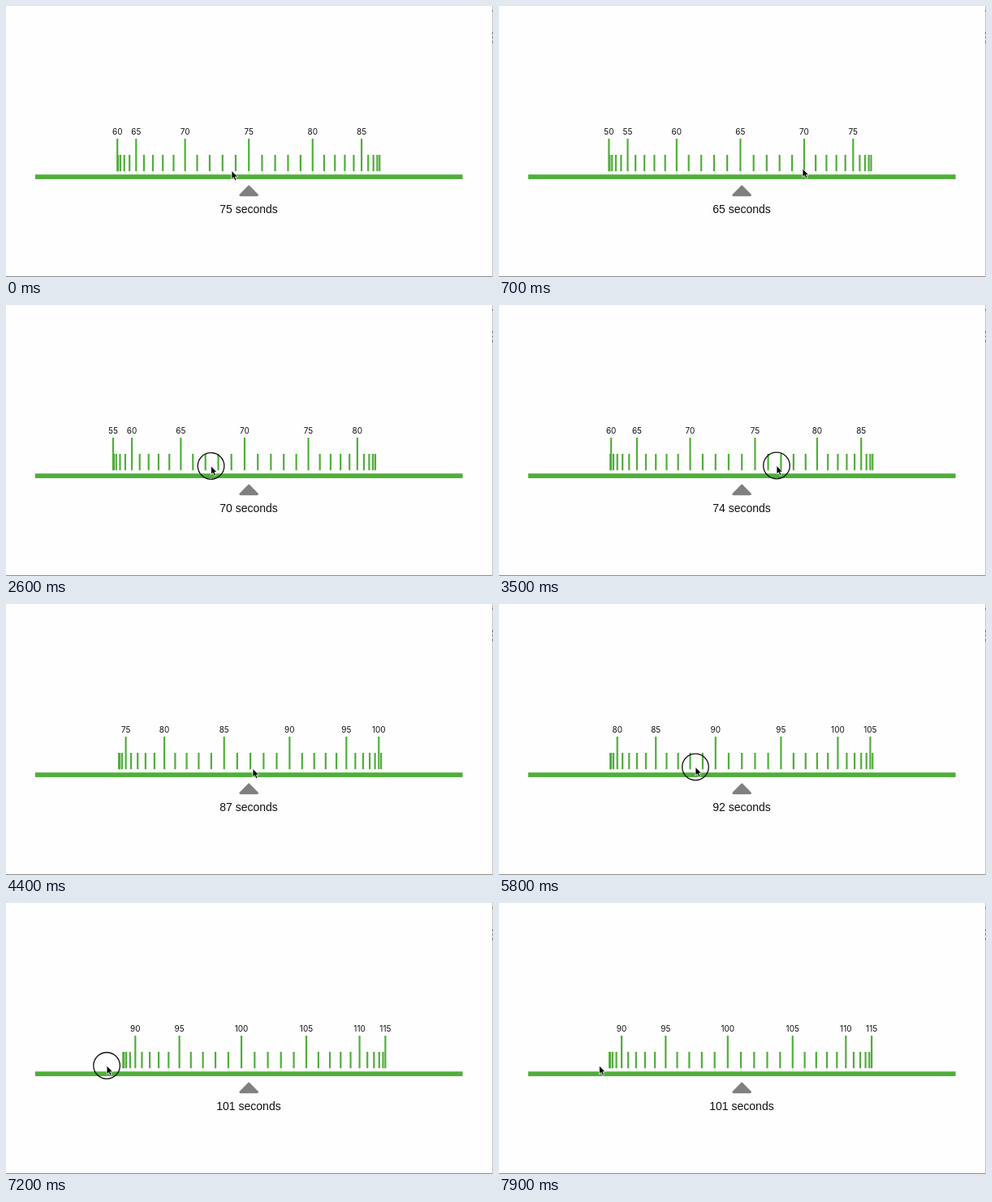
Recreate the animation shown at these times as an HTML page. Size 600 by 335 pixels, loop 8000 ms.

```html
<!DOCTYPE html>
<html lang="en">
<head>
<meta charset="utf-8">
<title>Seconds picker</title>
<style>
  html, body { margin: 0; width: 100%; height: 100%; overflow: hidden; background: #fefefe; }
  svg { display: block; }
  .ruler line { stroke: #50ae3b; stroke-width: 2.2; }
  .ruler text { font: 10px Inter, "Open Sans", sans-serif; }
  .readout { font: 14px "Liberation Sans", Arial, sans-serif; }
  text { text-anchor: middle; fill: #111; }
</style>
</head>
<body>
<svg width="600" height="335" viewBox="0 0 600 335">
  <path d="M0 334.5H600" stroke="#8c8c8c"/>
  <path d="M599.5 0V335" stroke="#c4c4c4"/>
  <path d="M599.5 5v2M599.5 32v3M599.5 38v2M599.5 43v3" stroke="#777"/>
  <g class="ruler" id="ruler"></g>
  <rect x="36" y="208.3" width="526.6" height="5.8" fill="#50ae3b"/>
  <path d="M299.2 223.2L309.5 233.7H288.9Z" fill="#808080" stroke="#808080" stroke-width="3" stroke-linejoin="round"/>
  <text class="readout" id="readout" x="299" y="256"></text>
  <g id="pointer">
    <circle id="ring" r="16.3" fill="none" stroke="#111" stroke-width="1.3"/>
    <path d="M0 0V10.6L2.4 8.4L4.1 12.2L6 11.4L4.4 7.7H7.6Z" fill="#000" stroke="#fff" stroke-width=".8"/>
  </g>
</svg>
<script>
const LOOP = 8000, STEP = 100;
const CENTER = 299.2, RADIUS = 162, SPACING = 16, TICKS = 30;
const $ = id => document.getElementById(id);

// Each key: time, values..., easing toward that key
const linear = p => p;
const glide = p => 1 - (1 - p) ** 3;
const smooth = p => p * p * (3 - 2 * p);

const valueKeys = [
  [0, [75]], [100, [74.6], linear], [500, [68], smooth], [800, [65], glide],
  [1900, [65]], [2000, [64.1], linear], [2300, [64], glide],
  [2700, [71.5], smooth], [3200, [74], glide], [3500, [74]],
  [3900, [84], smooth], [4400, [86.88], glide], [5200, [88], glide],
  [5350, [88]], [5800, [92], linear], [6600, [97.7], linear],
  [7400, [100.6], glide], [7900, [101.07], linear], [8000, [101], linear]
];
const pointerKeys = [
  [0, [278, 203.5]], [100, [282, 203.5], linear], [500, [374, 201], smooth],
  [1100, [374, 201]], [1900, [206, 197], smooth], [2000, [208, 197], linear],
  [2300, [342, 199], smooth], [2700, [236, 199], smooth], [3200, [342, 198.5], smooth],
  [3500, [342, 198.5]], [3900, [202, 202], smooth], [4400, [304, 203.5], smooth],
  [5200, [298, 202], glide], [5350, [298, 202]], [5800, [242, 201.5], linear],
  [6600, [163, 203], linear], [7400, [123.5, 201], glide], [8000, [123.5, 201]]
];
const presses = [[100, 500], [1700, 1900], [2300, 2700], [3500, 3900], [5400, 7500]];

function sample(keys, t) {
  const i = keys.findIndex(k => k[0] > t);
  const [t0, from] = keys[i - 1], [t1, to, ease = linear] = keys[i];
  const p = ease((t - t0) / (t1 - t0));
  return from.map((a, j) => a + (to[j] - a) * p);
}

function add(tag, attrs) {
  const el = document.createElementNS("http://www.w3.org/2000/svg", tag);
  for (const name in attrs) el.setAttribute(name, attrs[name]);
  return $("ruler").appendChild(el);
}

const ticks = Array.from({ length: TICKS }, (_, i) => {
  const angle = (i - TICKS / 2) * Math.PI / TICKS;
  const x = RADIUS * Math.sin(angle) * (1 - 0.04 * Math.cos(angle) ** 2);
  return {
    offset: i - TICKS / 2,
    line: add("line", { x1: x, x2: x, y2: 204.3 }),
    label: add("text", { x, y: 159 })
  };
});

function draw(t) {
  const [value] = sample(valueKeys, t);
  const whole = Math.round(value);
  // The wheel turns in whole ticks; the remainder slides it sideways
  const shift = CENTER + (whole - value) * SPACING;
  $("ruler").setAttribute("transform", `translate(${shift})`);
  for (const { offset, line, label } of ticks) {
    const n = whole + offset, major = n % 5 === 0;
    line.setAttribute("y1", major ? 164 : 184);
    label.textContent = major ? n : "";
  }
  $("readout").textContent = `${whole} seconds`;

  $("pointer").setAttribute("transform", `translate(${sample(pointerKeys, t)})`);
  const pressed = presses.some(([a, b]) => t >= a && t < b);
  $("ring").setAttribute("visibility", pressed ? "visible" : "hidden");
}

const start = performance.now();
function frame() {
  const t = (performance.now() - start) % LOOP;
  draw(Math.floor(t / STEP) * STEP);
  requestAnimationFrame(frame);
}
frame();
</script>
</body>
</html>
```
